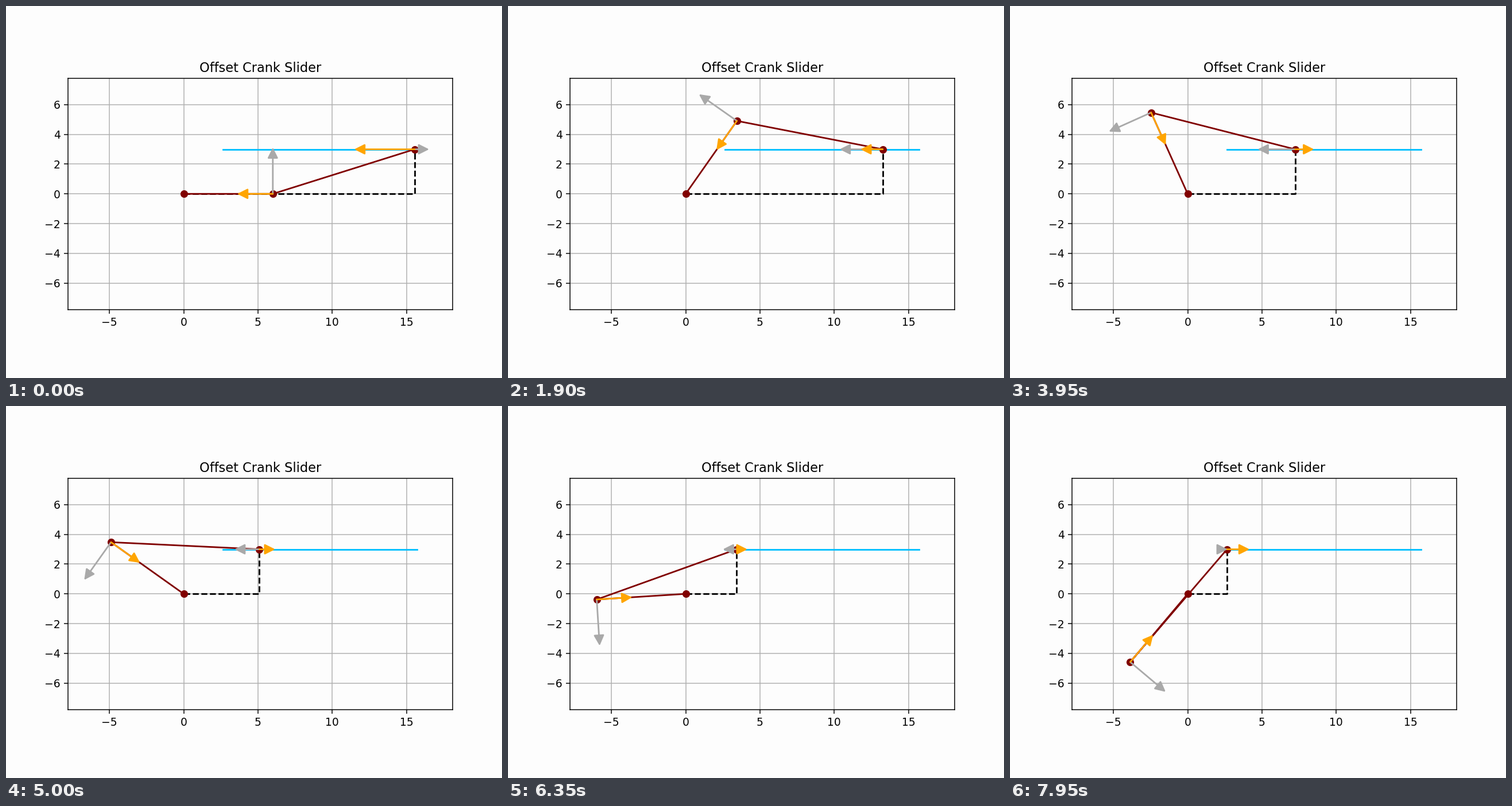
Animation of 864x648 px, one loop 8000 ms. Source, as a matplotlib script:

```python
import numpy as np
import matplotlib.pyplot as plt
from matplotlib.animation import FuncAnimation
from matplotlib.patches import FancyArrowPatch

CRANK, ROD, OFFSET = 6.0, 10.0, 3.0
VEL_SCALE = 3.12 / CRANK
ACC_SCALE = 2.40 / CRANK
STEP = 2 * np.pi / 249
FRAMES, INTERVAL = 160, 50
PAPER = "#fdfdfd"

fig, ax = plt.subplots(figsize=(6.4, 4.8), dpi=135, facecolor=PAPER)
ax.set_facecolor(PAPER)
ax.set_aspect("equal")
ax.set_xlim(-7.786, 18.087)
ax.set_ylim(-7.78, 7.78)
ax.grid(True)
ax.set_title("Offset Crank Slider")

# Slider track between its two dead centres
reach = [np.sqrt((ROD + s * CRANK) ** 2 - OFFSET ** 2) for s in (-1, 1)]
ax.plot(reach, [OFFSET, OFFSET], color="deepskyblue", lw=1.5)
guide, = ax.plot([], [], "--", color="black", lw=1.5)
links, = ax.plot([], [], "o-", color="maroon", lw=1.5, ms=6)


def add_arrow(color):
    arrow = FancyArrowPatch((0, 0), (1, 0), arrowstyle="-|>", mutation_scale=20,
                            shrinkA=0, shrinkB=0, lw=1.5, color=color, zorder=3)
    return ax.add_patch(arrow)


crank_vel, slider_vel = add_arrow("darkgray"), add_arrow("darkgray")
crank_acc, slider_acc = add_arrow("orange"), add_arrow("orange")


def point(arrow, start, vec, scale):
    start = np.asarray(start)
    arrow.set_positions(start, start + scale * np.asarray(vec))


def update(i):
    t = i * STEP
    px, py = CRANK * np.cos(t), CRANK * np.sin(t)
    rise = py - OFFSET
    run = np.sqrt(ROD ** 2 - rise ** 2)
    x = px + run

    # Derivatives of the slider position by crank angle
    vel = -py - rise * px / run
    acc = -px - (px ** 2 - rise * py) / run - (rise * px) ** 2 / run ** 3

    guide.set_data([0, x, x], [0, 0, OFFSET])
    links.set_data([0, px, x], [0, py, OFFSET])
    point(crank_vel, (px, py), (-py, px), VEL_SCALE)
    point(crank_acc, (px, py), (-px, -py), ACC_SCALE)
    point(slider_vel, (x, OFFSET), (vel, 0), VEL_SCALE)
    point(slider_acc, (x, OFFSET), (acc, 0), ACC_SCALE)
    return guide, links, crank_vel, slider_vel, crank_acc, slider_acc


anim = FuncAnimation(fig, update, frames=FRAMES, interval=INTERVAL,
                     init_func=lambda: update(0), repeat=True, repeat_delay=0)
plt.show()
```
